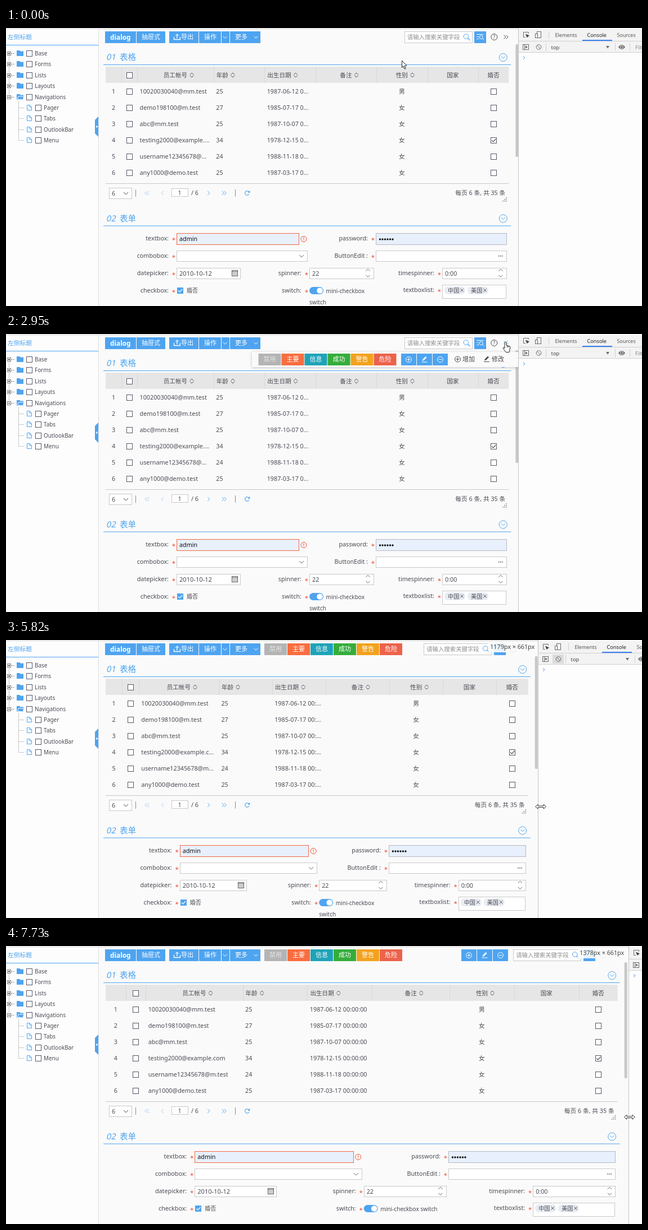
Write an HTML page with a canvas that moves like this. It is 1130 by 496 pixels and loops after 8 s.

```html
<!DOCTYPE html>
<html lang="zh">
<head>
<meta charset="utf-8">
<style>
html, body { margin: 0; width: 100%; height: 100%; overflow: hidden; background: #fafafa; }
canvas { display: block; width: 1130px; height: 496px; }
</style>
</head>
<body>
<canvas id="stage"></canvas>
<script>
const W = 1130, H = 496, LOOP = 8000, BASE = 910.3;
const BLUE = '#4ea4f0', INK = '#4b4a54', GREY = '#c9c9c9', BOX = '#5c5366', RED = '#f0482e';
const BG = '#fafafa', LIGHT = '#fdfdfd';
const FONT = '"Noto Sans", "Noto Sans CJK SC", "Noto Sans CJK", sans-serif';
const canvas = document.getElementById('stage'), ctx = canvas.getContext('2d');
const dpr = window.devicePixelRatio || 1;
canvas.width = W * dpr;
canvas.height = H * dpr;

const COLUMN_WIDTHS = [31, 31, 150, 100, 100, 120, 100, 100, 60];
const ROWS = [
  ['10020030040@mm.test', 25, '1987-06-12'], ['demo198100@m.test', 27, '1985-07-17'],
  ['abc@mm.test', 25, '1987-10-07'], ['testing2000@example.com', 34, '1978-12-15'],
  ['username12345678@m.test', 24, '1988-11-18'], ['any1000@demo.test', 25, '1987-03-17']];
const ACTIONS = [['禁用', '#b4b4b4'], ['主要', '#fa6d3f'], ['信息', '#1fa3b8'],
  ['成功', '#35ad3c'], ['警告', '#f3a21f'], ['危险', '#ec624b']];

// ---- motion ----
const smooth = p => p * p * (3 - 2 * p), accelerate = p => p * p;
const ramp = (t, start, duration, ease = smooth) => ease(Math.min(1, Math.max(0, (t - start) / duration)));

// Divider position: one long drag, one fast drag, two nudges
const divider = t => BASE + 86 * ramp(t, 5390, 680, accelerate) + 84 * ramp(t, 6370, 320) +
  12.8 * (ramp(t, 6960, 200) + ramp(t, 7540, 190));

const arc = (p, from, via, to) =>
  from.map((v, i) => v * (1 - p) ** 2 + 2 * via[i] * p * (1 - p) + to[i] * p * p);

function pointer(t) {
  const rest = [644, 32], menu = [887, 14];
  if (t < 1020) return arc(ramp(t, 30, 790), [703, 58], [690, 72], rest);
  if (t < 4280) return arc(ramp(t, 1020, 790), rest, [765, 18], menu);
  return arc(ramp(t, 4280, 760), menu, [1010, 150], [912, 290]);
}

function popupOpacity(t) {
  const clicks = [1840, 2280, 2760, 3290, 3820].filter(c => c <= t), n = clicks.length;
  if (!n || t >= 5390) return 0;
  const p = ramp(t, clicks[n - 1], 170);
  return n % 2 ? p : 1 - p;
}

// ---- drawing helpers ----
function setFont(size = 10.75, weight = 400) {
  ctx.font = `${weight} ${size}px ${FONT}`;
}
function text(s, x, y, color = INK, size = 10.75, align = 'left', weight = 400) {
  setFont(size, weight);
  ctx.textAlign = align;
  ctx.fillStyle = color;
  ctx.fillText(s, x, y + size * .36);
}
function rect(x, y, w, h, fill, stroke) {
  if (fill) { ctx.fillStyle = fill; ctx.fillRect(x, y, w, h); }
  if (stroke) { ctx.strokeStyle = stroke; ctx.lineWidth = 1; ctx.strokeRect(x + .5, y + .5, w - 1, h - 1); }
}
function pill(x, y, w, h, r, fill) {
  ctx.beginPath(); ctx.roundRect(x, y, w, h, r); ctx.fillStyle = fill; ctx.fill();
}
function poly(points, stroke, fill, width = 1) {
  ctx.beginPath();
  points.forEach(([x, y]) => ctx.lineTo(x, y));
  if (fill) { ctx.closePath(); ctx.fillStyle = fill; ctx.fill(); }
  if (stroke) { ctx.strokeStyle = stroke; ctx.lineWidth = width; ctx.stroke(); }
}
function ring(x, y, r, stroke, fill) {
  ctx.beginPath(); ctx.arc(x, y, r, 0, 7);
  if (fill) { ctx.fillStyle = fill; ctx.fill(); }
  if (stroke) { ctx.strokeStyle = stroke; ctx.lineWidth = 1; ctx.stroke(); }
}
const hline = (x1, x2, y, color) => rect(x1, y, x2 - x1, 1, color);
const vline = (x, y1, y2, color) => rect(x, y1, 1, y2 - y1, color);

// Positive size points down / right
const chevV = (x, y, s, color) => poly([[x - Math.abs(s), y - s / 2], [x, y + s / 2], [x + Math.abs(s), y - s / 2]], color);
const chevH = (x, y, s, color) => poly([[x - s / 2, y - Math.abs(s)], [x + s / 2, y], [x - s / 2, y + Math.abs(s)]], color);
const tick = (x, y, color) => poly([[x - 3, y], [x - .5, y + 2.5], [x + 4, y - 2.5]], color, null, 1.2);
function cross(x, y, r, color) {
  for (const s of [-r, r]) poly([[x - s, y - r], [x + s, y + r]], color);
}
function checkbox(x, y, checked) {
  rect(Math.round(x - 5.5), Math.round(y - 5.5), 11, 11, '#fff', BOX);
  if (checked) tick(x, y, INK);
}
function plusMinus(x, y, color, plus) {
  ring(x, y, 5, color);
  poly([[x - 3, y], [x + 3, y]], color);
  if (plus) poly([[x, y - 3], [x, y + 3]], color);
}
function pencil(x, y, color) {
  poly([[x - 4, y + 3], [x - 3, y], [x + 2, y - 5], [x + 4, y - 3], [x - 1, y + 2]], null, color);
  poly([[x - 5, y + 5], [x + 5, y + 5]], color);
}
function fit(s, width) {
  setFont();
  const wide = str => ctx.measureText(str).width > width;
  if (!wide(s)) return s;
  while (wide(s + '...')) s = s.slice(0, -1);
  return s + '...';
}

// ---- sidebar ----
function drawSidebar() {
  const step = 19.4;
  rect(0, 0, 164, H, LIGHT);
  text('左侧标题', 3, 16, BLUE, 10.75, 'left', 500);
  hline(0, 164, 30, BLUE);
  vline(164, 2, H, '#dedede');
  ['Base', 'Forms', 'Lists', 'Layouts', 'Navigations'].forEach((name, i) => {
    const y = Math.round(45 + i * step), open = i === 4;
    if (i) vline(5, y - 15, y - 4, '#c4c4c4');
    hline(9, 15, y, '#b0b0b0');
    rect(2, y - 3, 7, 7, '#fff', '#777');
    hline(4, 7, y, '#222');
    if (!open) vline(5, y - 1, y + 2, '#222');
    rect(19, y - 5, 6, 3, BLUE);
    rect(19, y - 3.5, 12, 8.5, BLUE);
    if (open) poly([[20, y + 4], [22, y - 1], [32, y - 1], [30, y + 5]], LIGHT, BLUE);
    checkbox(41, y);
    text(name, 51, y + .5, INK, 9.9);
  });
  vline(22, 130, 200, GREY);
  ['Pager', 'Tabs', 'OutlookBar', 'Menu'].forEach((name, i) => {
    const y = Math.round(142 + i * step);
    hline(22, 32, y, GREY);
    poly([[37.5, y - 4.5], [42, y - 4.5], [45.5, y - 1], [45.5, y + 4.5], [37.5, y + 4.5], [37.5, y - 4.5]], BLUE, '#fff');
    poly([[42, y - 4.5], [42, y - 1], [45, y - 1]], BLUE);
    checkbox(57, y);
    text(name, 67, y + .5, INK, 9.9);
  });
  poly([[164, 158], [164, 194], [158, 188], [158, 164]], null, BLUE);
  poly([[162.5, 173.5], [159.5, 176], [162.5, 178.5]], null, '#fff');
}

// ---- toolbar ----
function actionButtons(x, y) {
  ACTIONS.forEach(([label, color], i) => {
    rect(x + i * 41, y, 40, 21, color);
    text(label, x + i * 41 + 20, y + 10.5, i ? '#fff' : '#e4e4e4', 11, 'center');
  });
}
function iconButtons(x, y) {
  for (let i = 0; i < 3; i++) rect(x + i * 28, y, 27, 21, BLUE);
  plusMinus(x + 13.5, y + 10.5, '#fff', true);
  pencil(x + 41.5, y + 10, '#fff');
  plusMinus(x + 69.5, y + 10.5, '#fff', false);
}
function drawToolbar(right, open, hover) {
  const white = '#fff';
  let x = 176;
  // Buttons flow left to right; icon and caret are extra widths beside the label
  const button = (label, { icon = 0, caret = 0, size = 11, weight = 400 } = {}) => {
    setFont(size, weight);
    const width = Math.round(ctx.measureText(label).width) + 18 + icon + caret;
    rect(x, 6, width, 21, BLUE);
    text(label, x + 9 + icon, 16.5, white, size, 'left', weight);
    if (caret) chevV(x + width - caret / 2 - 1, 16.5, 3.5, white);
    x += width + 1;
  };
  button('dialog', { size: 11.8, weight: 600 });
  button('抽屉式');
  x = 290;
  const tray = x + 14;
  button('导出', { icon: 12 });
  button('操作', { caret: 14 });
  vline(x - 16, 6, 27, white);
  button('更多', { caret: 14 });
  poly([[tray - 5.5, 16], [tray - 5.5, 20.5], [tray + 5.5, 20.5], [tray + 5.5, 16]], white, null, 1.3);
  poly([[tray, 18], [tray, 11]], white, null, 1.5);
  chevV(tray, 12.5, -3.5, white);

  if (right > 914) actionButtons(459, 6);
  if (right > 1008) iconButtons(Math.round(right - 295), 6);

  rect(Math.floor(right - 202), 6, 121, 21, '#fff', GREY);
  text('请输入搜索关键字段', right - 197.5, 16.5, '#8c8c8c', 10.4);
  ring(right - 93, 15, 4.3, BLUE);
  poly([[right - 90, 18], [right - 86, 22]], BLUE, null, 1.3);
  rect(Math.round(right - 78), 6, 21, 21, BLUE);
  for (let i = 0; i < 3; i++) poly([[right - 74, 11.5 + i * 4], [right - (i ? 70 : 62), 11.5 + i * 4]], white);
  ring(right - 66, 16.5, 3, white);
  poly([[right - 64, 18.5], [right - 61, 21.5]], white);
  ring(right - 43, 16, 5.5, INK);
  text('?', right - 43, 16, INK, 8.5, 'center');
  ctx.save();
  ctx.translate(right - 22, 16);
  ctx.rotate(open * Math.PI / 2);
  for (const dx of [-2, 2]) chevH(dx, 0, 3.5, hover ? BLUE : INK);
  ctx.restore();
}
function drawPopup(alpha) {
  if (!alpha) return;
  ctx.save();
  ctx.globalAlpha = alpha;
  ctx.shadowColor = 'rgba(0,0,0,.22)';
  ctx.shadowBlur = 5 * dpr;
  ctx.shadowOffsetY = dpr;
  rect(437, 32, 473, 27, BG);
  ctx.shadowColor = 'transparent';
  actionButtons(448.5, 35);
  iconButtons(702, 35);
  plusMinus(802.5, 45, INK, true);
  text('增加', 811, 45, INK, 11);
  pencil(854, 44.5, INK);
  text('修改', 863, 45, INK, 11);
  ctx.restore();
}

// ---- content ----
function drawHeading(number, title, y, right) {
  ctx.save();
  ctx.transform(1, 0, -.2, 1, y * .2, 0);
  text(number, 179, y, BLUE, 14.8, 'left', 300);
  ctx.restore();
  text(title, 202, y, BLUE, 14.6);
  hline(173, right - 13, y + 13, BLUE);
  ring(right - 27, y + .5, 7, BLUE);
  chevV(right - 27, y + .5, 3.5, BLUE);
}

function drawTable(right, striped) {
  const width = right - 17 - 177, total = COLUMN_WIDTHS.reduce((a, b) => a + b);
  const col = [177];
  COLUMN_WIDTHS.forEach((w, i) => col.push(col[i] + w / total * width));
  const mid = i => (col[i] + col[i + 1]) / 2;
  const header = (i, name, { left, sortable }) => {
    const half = name.length * 5.3, x = left ? col[i] + 5 + half : mid(i);
    text(name, x, 84, INK, 10.6, 'center');
    if (sortable) for (const s of [-1, 1]) chevV(x + half + 8, 84 + s * 2.3, s * 3.3, INK);
  };
  rect(177, 69, width, 29, '#e6e6e6');
  col.slice(1, -1).forEach(x => vline(Math.round(x), 69, 98, '#d9d9d9'));
  checkbox(mid(1), 84);
  header(2, '员工帐号', { sortable: true });
  header(3, '年龄', { left: true, sortable: true });
  header(4, '出生日期', { left: true, sortable: true });
  header(5, '备注', { sortable: true });
  header(6, '性别', { sortable: true });
  header(7, '国家', {});
  header(8, '婚否', {});
  ROWS.forEach(([account, age, born], i) => {
    const y = 113.5 + i * 29;
    if (striped) rect(177, y - 14.5, width, 29, i % 2 ? '#f4f4f4' : '#fcfcfc');
    text(i + 1, mid(0), y, INK, 10.75, 'center');
    checkbox(mid(1), y);
    text(fit(account, col[3] - col[2] - 11), col[2] + 4.5, y);
    text(age, col[3] + 4.5, y);
    text(fit(born + ' 00:00:00', col[5] - col[4] - 11), col[4] + 4.5, y);
    text(i ? '女' : '男', mid(6), y, INK, 10.75, 'center');
    checkbox(mid(8), y, i === 3);
  });
  hline(177, right - 17, 277, GREY);
  drawPager(right);
}

function drawPager(right) {
  const y = 294.5, pale = '#9cc9f5';
  rect(183, 285, 41, 20, '#fff', GREY);
  text('6', 188, 295.5);
  chevV(213, 295, 4, INK);
  for (const x of [230, 407]) vline(x, 288, 301, '#8a8a8a');
  for (const dx of [-2, 2]) {
    chevH(250.5 + dx, y, -3.5, pale);
    chevH(387.5 + dx, y, 3.5, BLUE);
  }
  chevH(278, y, -3.5, pale);
  chevH(360, y, 3.5, BLUE);
  rect(294, 286, 30, 15, '#fff', GREY);
  text('1', 308.5, 294, INK, 10.75, 'center');
  text('/ 6', 329, 294);
  ctx.beginPath(); ctx.arc(428.5, y, 3.8, .5, 5.6);
  ctx.strokeStyle = BLUE; ctx.lineWidth = 1.1; ctx.stroke();
  poly([[433.5, y - 4.5], [433, y], [429.5, y - 1.5]], null, BLUE);
  text('每页 6 条, 共 35 条', right - 23, 294, INK, 10.75, 'right');
  for (let r = 0; r < 3; r++)
    for (let c = 2 - r; c < 3; c++) rect(right - 28 + c * 3, 302 + r * 3, 1.4, 1.4, '#666');
}

function drawForm(right, striped) {
  // Every edge moves by a number of sixths of the extra width
  const d = right - BASE, at = (x, sixths) => x + d * sixths / 6;
  const c1 = at(303, 1), c2 = at(539, 3), c3 = at(775, 5), half = at(657, 4), end = at(889, 6);
  if (striped) rect(173, 353, right - 186, 140, '#f5f5f5');
  const label = (s, x, y) => {
    text(s + ':', x - 14, y, INK, 10.75, 'right');
    text('*', x - 5, y + 2, RED, 11.5, 'center');
  };
  const field = (name, x, x2, y, { fill = '#fff', stroke = GREY, h = 20 } = {}) => {
    label(name, x, y - .5);
    x = Math.round(x);
    rect(x, y - 10, Math.round(x2) - x + 1, h, fill, stroke);
  };
  const spin = x => [-1, 1].forEach(s => chevV(x - 10, 437.3 + s * 5.3, s * 3.5, '#666'));

  const filled = { fill: '#e8f0fd', h: 21 };
  field('textbox', c1, at(520, 3), 376, { ...filled, stroke: '#f06a45' });
  text('admin', c1 + 5, 376.5, '#111');
  const error = at(529, 3);
  ring(error, 376.5, 5, RED);
  rect(error - .5, 373.5, 1, 4, RED);
  rect(error - .5, 378.5, 1, 1, RED);
  field('password', half, end, 376, { ...filled, stroke: '#b5b9c2' });
  for (let i = 0; i < 6; i++) ring(half + 7.5 + i * 4.5, 377, 1.7, null, '#111');

  field('combobox', c1, at(535, 3), 407);
  chevV(at(525, 3), 407, 4, '#666');
  field('ButtonEdit ', half, end, 407);
  for (let i = -1; i < 2; i++) rect(end - 11 + i * 3, 406, 1.5, 1.5, '#444');

  field('datepicker', c1, at(416, 2), 438);
  text('2010-10-12', c1 + 5, 438, INK, 11.1);
  const cal = Math.round(at(401, 2));
  rect(cal, 432, 11, 11, null, '#555');
  hline(cal, cal + 11, 434, '#555');
  for (let i = 0; i < 9; i++) rect(cal + 2 + i % 3 * 2.8, 436 + Math.floor(i / 3) * 2, 1.5, 1.2, '#666');
  field('spinner', c2, at(653, 4), 438);
  text('22', c2 + 5, 438);
  spin(at(653, 4));
  field('timespinner', c3, end, 438);
  text('0:00', c3 + 5, 438);
  spin(end);

  label('checkbox', c1, 468.5);
  rect(Math.round(c1) + 1, 463, 11, 11, BLUE);
  tick(c1 + 6.2, 468.5, '#fff');
  text('婚否', c1 + 18, 468.5, INK, 10);
  label('switch', c2, 468.5);
  pill(c2, 462, 25, 13, 6.5, BLUE);
  ring(c2 + 18.5, 468.5, 5.3, null, '#fff');
  const wrapped = d < 90;
  text(wrapped ? 'mini-checkbox' : 'mini-checkbox switch', c2 + 29.5, 469, INK, 10.1);
  if (wrapped) text('switch', c2, 489.5, INK, 10.1);
  field('textboxlist', c3, end - 1, 468, { h: 25 });
  ['中国', '美国'].forEach((name, i) => {
    const x = c3 + 4 + i * 41;
    pill(x, 461, 37, 14, 6, '#e9edf3');
    text(name, x + 6, 468, INK, 10.2);
    cross(x + 31, 467.8, 2.8, INK);
  });
  pill(right - 5, 29, 5, wrapped ? 201 : 207, 2, '#c8c8c8');
}

// ---- devtools ----
function drawDevtools(x, hover) {
  const icon = '#6a6a6a', sep = '#cfcfcf', bar = '#f3f3f3', accent = '#3a82f0';
  ctx.save();
  ctx.translate(x, 0);
  rect(0, 0, W, H, LIGHT);
  rect(0, 2, W, 42, bar);
  hline(0, W, 23, sep);
  hline(0, W, 43, sep);
  vline(0, 0, H, '#c4c4c4');
  poly([[13, 16.5], [9.5, 16.5], [9.5, 7.5], [18.5, 7.5], [18.5, 10]], icon);
  poly([[13, 10.5], [20, 13.5], [15.5, 17]], null, '#444');
  rect(33, 6, 8, 12, null, icon);
  rect(30, 10, 5, 8, bar, icon);
  vline(54, 6, 19, sep);
  text('Elements', 65.5, 12.5, '#555', 9);
  text('Console', 122.5, 12.5, '#222', 9.2);
  text('Sources', 175.5, 12.5, '#555', 9);
  rect(114, 21, 53, 2, accent);
  rect(8, 29, 11, 10, null, icon);
  vline(11, 29, 39, icon);
  poly([[13, 31.5], [17, 34], [13, 36.5]], null, icon);
  if (hover) rect(26, 26, 20, 16, '#dcdcdc');
  ring(36.5, 34, 4.3, icon);
  poly([[33.5, 31], [39.5, 37]], icon);
  for (const s of [49, 172, 198]) vline(s, 27, 41, sep);
  text('top', 58.5, 34.5, '#444', 9.4);
  poly([[156, 32], [162, 32], [159, 36.5]], null, icon);
  ctx.beginPath();
  ctx.moveTo(178, 34); ctx.quadraticCurveTo(184, 26, 190, 34); ctx.quadraticCurveTo(184, 42, 178, 34);
  ctx.fillStyle = icon; ctx.fill();
  ring(184, 34, 2.5, bar);
  text('Filter', 208, 34.5, '#888', 9.2);
  chevH(10.5, 53, 2.6, accent);
  ctx.restore();
}

// ---- cursors ----
function drawCursor(kind, [x, y]) {
  ctx.save();
  ctx.translate(x, y);
  ctx.lineJoin = 'round';
  if (kind === 'arrow') {
    poly([[.5, .5], [.5, 12.5], [3.2, 10], [5, 15], [7, 14.2], [5.2, 9.3], [9, 9], [.5, .5]], '#222', '#fff');
  } else if (kind === 'hand') {
    poly([[-1, 1], [.5, .3], [2, 1], [2, 6], [8, 8], [9, 10], [7, 18.5], [1, 18.5],
      [-3.8, 11.5], [-3, 9.7], [-1, 11.5], [-1, 1]], '#222', '#fff');
    for (const s of [3, 5.5]) vline(s, 7, 10, '#222');
  } else {
    const quarter = [[9.5, 0], [5, 4], [5, 1.3]];
    const mirrored = [...quarter, ...quarter.map(([px, py]) => [-px, py]).reverse()];
    poly([...mirrored, ...mirrored.map(([px, py]) => [-px, -py])], '#333', '#fff');
  }
  ctx.restore();
}

function draw(t) {
  const edge = Math.round(divider(t)), right = divider(t - t % 60); // page reflows behind the divider
  const open = popupOpacity(t), mouse = pointer(t);
  const dragging = t >= 5390, hover = mouse[0] > 878 && mouse[1] < 28;
  const striped = t >= 4280 && t < 4320;
  ctx.setTransform(dpr, 0, 0, dpr, 0, 0);
  rect(0, 0, W, H, BG);
  drawSidebar();
  drawToolbar(right, open, hover);
  drawHeading('01', '表格', 52, right);
  drawTable(right, striped);
  drawHeading('02', '表单', 339.5, right);
  drawForm(right, striped);
  drawPopup(open);
  hline(0, edge, 1, '#d4d4d4');
  if (dragging) {
    rect(right - 88, 2, 88, 20, 'rgba(252,252,252,.88)');
    text(`${Math.round((right - 1.7) / .8)}px × 661px`, right - 45, 12.5, '#444', 10.75, 'center');
  }
  drawDevtools(edge, dragging);
  if (t >= 5110) drawCursor('resize', [divider(t + 20) + 2, 295.5 + (edge - BASE) / 20]);
  else drawCursor(hover ? 'hand' : 'arrow', mouse);
}

function frame() {
  draw(performance.now() % LOOP);
  requestAnimationFrame(frame);
}
frame();
</script>
</body>
</html>
```
